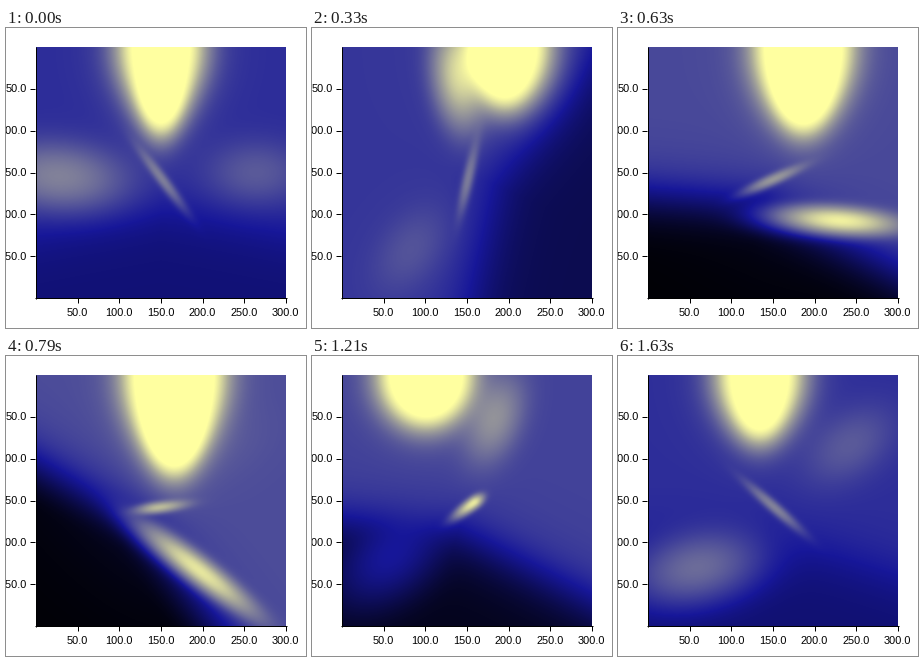
Write a matplotlib script that moves like this. It is 300x300 px and loops after 1.68 s.

```python
import numpy as np
import matplotlib.pyplot as plt
from matplotlib.animation import FuncAnimation
from matplotlib.colors import LinearSegmentedColormap

SIZE, DPI = 300, 72
FRAMES, INTERVAL = 40, 42
LEFT, RIGHT, TOP, BOTTOM = 30, 280, 19, 270
CX, CY = 155, 145

# Key bearings in degrees, clockwise from the right, at moments of the loop
MOMENTS = (0, 4, 12, 19, 24, 29, FRAMES)
STREAK_TURN = (233, 260, 320, 358, 412, 527, 593)
CLOUD_TURN = (178, 201, 370, 430, 521, 681, 898)
SHADE_TURN = (90, -10, 80, 140, 30, 125, 90)

CMAP = LinearSegmentedColormap.from_list("dusk", [
    (0.00, (0, 0, 0)),
    (0.30, (0.09, 0.09, 0.60)),
    (0.55, (0.42, 0.42, 0.60)),
    (0.75, (0.66, 0.66, 0.60)),
    (1.00, (1, 1, 0.63)),
], N=512)

X, Y = np.meshgrid(np.arange(LEFT, RIGHT) + 0.5, np.arange(TOP, BOTTOM) + 0.5)


def bearing(turns, k):
    return np.radians(np.interp(k, MOMENTS, turns))


def rotated(x, y, angle):
    """Grid coordinates along and across a direction through (x, y)."""
    c, s = np.cos(angle), np.sin(angle)
    dx, dy = X - x, Y - y
    return dx * c + dy * s, dy * c - dx * s


def polar(radius, angle):
    return CX + radius * np.cos(angle), CY + radius * np.sin(angle)


def blob(x, y, angle, length, width, level, blunt=None):
    u, v = rotated(x, y, angle)
    if blunt is not None:
        length = np.where(u > 0, length, blunt)
    return level * np.exp(-((u / length) ** 2 + (v / width) ** 2) / 2)


def plume(t):
    """Saturated half ellipse swinging along the top, with a halo."""
    width = 30 - 5 * np.cos(t)
    depth = (52 + 20 * np.cos(2 * t) + 18 * np.sin(3 * t)
             + 10 * np.sin(t))
    dx, dy = X - CX - 43 * np.sin(t), Y - TOP
    r = np.hypot(dx / width, dy / depth)
    gap = np.hypot(dx, dy) * (1 - 1 / np.maximum(r, 1))
    return 1 / (1 + (gap / 28) ** 2)


def streak(t, k):
    """Turning streak that shortens to a comet and grows back."""
    squeeze = ((1 + np.cos(t - np.radians(225))) / 2) ** 2
    tail = bearing(STREAK_TURN, k)
    x, y = polar(-8 * squeeze, tail)
    return blob(x + 1, y + 6, tail, 40 - 20 * squeeze, 6,
                0.55 + 0.4 * squeeze, blunt=38 - 30 * squeeze)


def cloud(t, k):
    x, y = polar(90 + 12 * np.cos(t), bearing(CLOUD_TURN, k))
    angle = t + np.radians(31 - 26 * np.cos(t))
    return blob(x, y, angle,
                58 + 12 * np.cos(2 * t),
                25 + 12 * np.cos(t + np.radians(30)),
                0.72 + 0.22 * np.cos(t - np.radians(130)))


def backdrop(t, k, depth):
    """Blue ground, lifted on one side and sunk into a wedge of shade."""
    ahead, across = rotated(CX, CY, bearing(SHADE_TURN, k))
    shade = 1 / (1 + np.exp(-(ahead - 0.2 * np.abs(across) - 35) / 16))
    return np.maximum(0.33 + depth * (0.12 - 0.45 * shade), 0)


def field(k):
    t = 2 * np.pi * k / FRAMES
    depth = 0.7 - 0.4 * np.cos(t)
    haze = blob(*polar(95, 2 * t), 2 * t, 55, 35, 0.5 * (1 - depth / 2))
    layers = (backdrop(t, k, depth), haze, plume(t), streak(t, k), cloud(t, k))
    return np.clip(sum(v ** 3 for v in layers) ** (1 / 3), 0, 1)


fig = plt.figure(figsize=(SIZE / DPI, SIZE / DPI), dpi=DPI, facecolor="white")
ax = fig.add_axes([0, 0, 1, 1])
image = ax.imshow(field(0), cmap=CMAP, vmin=0, vmax=1, aspect="auto",
                  extent=(LEFT, RIGHT, BOTTOM, TOP), interpolation="nearest")
ax.set_xlim(0, SIZE)
ax.set_ylim(SIZE, 0)
ax.axis("off")


def line(xs, ys):
    ax.plot(xs, ys, color="black", lw=1, solid_capstyle="butt")


def label(x, y, value, ha):
    ax.text(x, y, f"{value:.1f}", family="Liberation Sans", size=11,
            ha=ha, va="center_baseline")


line((29.5, 29.5), (TOP, BOTTOM + 1))
line((29, RIGHT + 1), (BOTTOM, BOTTOM))
for n in range(1, 7):
    tick = n * 250 / 6
    x = round(LEFT + tick) - 0.5
    line((x, x), (270, 275))
    label(LEFT + tick - 0.5, 284, n * 50, "center")
    if n < 6:
        y = int(TOP + tick) + 0.5
        line((24, 29), (y, y))
        label(20.5, y, n * 50, "right")


def update(k):
    image.set_data(field(k))
    return [image]


anim = FuncAnimation(fig, update, frames=FRAMES, interval=INTERVAL,
                     repeat=True, repeat_delay=0, blit=False)
plt.show()
```
